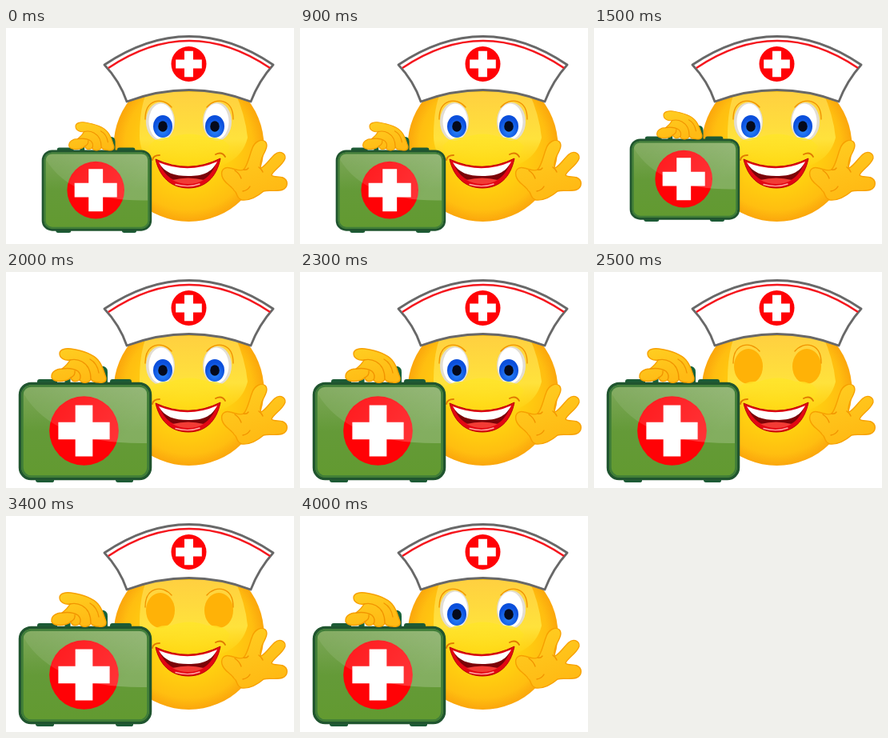
Write an HTML page that moves like this. It is 360 px wide and 270 px high and loops after 4.5 s.

```html
<!DOCTYPE html>
<html lang="en">
<head>
<meta charset="utf-8">
<title>Nurse smiley with first-aid kit</title>
<style>
  html, body { margin: 0; width: 100%; height: 100%; overflow: hidden; background: #fff; }
  svg { display: block; width: 100%; height: 100%; }
  .skin { fill: url(#skin); stroke: #f7a000; stroke-width: 1.4; stroke-linejoin: round; }
  .crease { fill: none; stroke: #f29400; stroke-width: 1.4; stroke-linecap: round; }
</style>
</head>
<body>
<svg viewBox="0 0 360 270">
  <defs>
    <radialGradient id="face" cx=".5" cy=".5" r=".5">
      <stop offset="0" stop-color="#ffdc14"/>
      <stop offset=".5" stop-color="#ffd210"/>
      <stop offset=".85" stop-color="#ffbe10"/>
      <stop offset="1" stop-color="#fba60c"/>
    </radialGradient>
    <linearGradient id="shine" x2="0" y2="1">
      <stop offset="0" stop-color="#ffd040"/>
      <stop offset=".6" stop-color="#ffe23c"/>
      <stop offset="1" stop-color="#ffe020" stop-opacity="0"/>
    </linearGradient>
    <linearGradient id="cheek" x2="0" y2="1">
      <stop offset="0" stop-color="#ffe52c"/>
      <stop offset="1" stop-color="#ffdc14" stop-opacity="0"/>
    </linearGradient>
    <linearGradient id="skin" x2=".4" y2="1">
      <stop offset="0" stop-color="#ffcf22"/>
      <stop offset="1" stop-color="#ffba14"/>
    </linearGradient>
    <radialGradient id="iris" cy=".65">
      <stop offset="0" stop-color="#2f8cff"/>
      <stop offset="1" stop-color="#0b4fdc"/>
    </radialGradient>
    <linearGradient id="case" x2="0" y2="1">
      <stop offset="0" stop-color="#7fa85c"/>
      <stop offset=".5" stop-color="#649a38"/>
      <stop offset="1" stop-color="#629a30"/>
    </linearGradient>
    <linearGradient id="gloss" x2="1" y2=".3">
      <stop offset="0" stop-color="#fff" stop-opacity=".06"/>
      <stop offset="1" stop-color="#fff" stop-opacity=".2"/>
    </linearGradient>
    <g id="emblem">
      <circle r="22" fill="#ff0206"/>
      <path d="M-5.500-16.300H5.500V-5.500H16.300V5.500H5.500V16.300H-5.500V5.500H-16.300V-5.500H-5.500Z" fill="#fff"/>
    </g>
    <g id="eye">
      <ellipse cx="193" cy="117" rx="18" ry="24" fill="#e2ddd2"/>
      <ellipse cx="194" cy="117" rx="15.500" ry="22.500" fill="#fff"/>
      <ellipse cx="196" cy="123" rx="12" ry="14" fill="url(#iris)"/>
      <ellipse cx="196" cy="123" rx="5.800" ry="6.800" fill="#050a1c"/>
    </g>
    <ellipse id="lid" cx="193" cy="118" rx="18" ry="22" fill="#ffb207"/>
    <path id="brow" d="M174 114C174 88 196 86 207 99" class="crease"/>
  </defs>

  <rect width="360" height="270" fill="#fff"/>
  <circle cx="228.500" cy="148" r="94" fill="url(#face)"/>
  <path d="M176 80H286Q299 108 302 137Q292 178 229 178Q167 178 167 135Q167 100 176 80Z" fill="url(#shine)"/>

  <g id="open">
    <use href="#eye"/>
    <use href="#eye" transform="matrix(-1 0 0 1 457 0)"/>
  </g>
  <g id="closed">
    <use href="#lid"/>
    <use href="#lid" transform="matrix(-1 0 0 1 459 0)"/>
  </g>
  <use href="#brow"/>
  <use href="#brow" transform="matrix(-1 0 0 1 458 0)"/>
  <path d="M178 148Q188 135 206 137Q229 128 252 137Q270 135 280 148L268 170H190Z" fill="url(#cheek)"/>

  <g id="mouth">
    <path d="M187 164Q228 183 268 163C263 188 248 200 228 200C206 200 192 186 187 164Z" fill="#e30613" stroke="#b90008" stroke-width="1"/>
    <path d="M192 169Q228 183 263 168C257 185 246 194 228 194C210 194 198 185 192 169Z" fill="#7b0308"/>
    <path d="M191 168Q228 183 264 167C257 181 246 185 228 185C210 185 198 181 191 168Z" fill="#fff"/>
    <path d="M208 190Q228 185 247 190Q239 195 228 195Q217 195 208 190Z" fill="#f23b35"/>
    <path d="M212 195.500Q228 200 242 195" fill="none" stroke="#ffaaa4" stroke-width="1.400" stroke-linecap="round"/>
    <path d="M183 165Q184 159 192 159M262 158Q270 154 274 161" class="crease" style="stroke:#e07a00;stroke-width:1.800"/>
  </g>

  <g id="hat">
    <path d="M123 46Q229-25 334 46Q316 66 306 92Q229 63 151 92Q142 66 123 46Z" fill="#fff" stroke="#686868" stroke-width="2.800" stroke-linejoin="round"/>
    <path d="M128 50Q229-18 330 50" fill="none" stroke="#f5161d" stroke-width="2.600"/>
    <use href="#emblem" x="228.500" y="45"/>
  </g>

  <g id="wave">
    <path class="skin" d="M270 185C268 177 274 173 280 175C286 176 292 180 297 177C302 172 304 160 308 150C311 142 319 138 324 142C329 147 323 155 320 162C318 168 317 173 319 175C326 171 330 163 336 158C343 152 352 158 348 165C344 173 334 178 332 184C335 187 341 185 346 187C353 190 353 199 346 202C338 205 329 202 322 204C315 210 305 216 295 215C287 213 290 206 285 203C281 196 272 194 270 185Z"/>
    <path class="crease" d="M286 178Q292 182 294 188M297 177Q301 178 303 175M316 174Q320 177 321 180M296 204Q302 203 305 198"/>
  </g>

  <g id="kit">
    <path d="M77 139V125Q77 121 81 121H119Q123.500 121 123.500 125V139" fill="none" stroke="#17633a" stroke-width="7"/>
    <path d="M39 140V137Q39 134 42 134H61Q64 134 64 137V140M130 140V137Q130 134 133 134H154Q157 134 157 137V140M37 258H60V261Q60 263 57 263H40Q37 263 37 260M137 258H159V261Q159 263 156 263H140Q137 263 137 260" fill="#1d5b36"/>
    <rect x="17.500" y="139.500" width="163" height="119" rx="14" fill="url(#case)" stroke="#20552f" stroke-width="3.500"/>
    <rect x="20.500" y="142.500" width="157" height="113" rx="11" fill="none" stroke="#3f7d38" stroke-width="2.500"/>
    <use href="#emblem" transform="translate(97.500 198.500) scale(1.970)"/>
    <path d="M22 152Q22 144 30 144H168Q176 144 176 152V214Q60 216 22 152Z" fill="url(#gloss)"/>
    <path class="skin" d="M70 121C74 118 78 114 80 110C74 111 67 108 67 102C67 97 74 95 81 96C94 98 108 102 115 110C121 117 122 124 125 132C126 138 120 139 116 138C111 138 108 137 106 134C104 139 95 140 92 135C87 138 82 137 81 132C76 137 60 139 57 132C56 125 63 121 70 121Z"/>
    <path class="crease" d="M80 110Q88 108 95 112M70 121Q82 119 90 124Q95 129 92 135M81 132Q87 129 86 124M95 112Q106 118 106 134M105 109Q114 114 116 126"/>
  </g>
</svg>
<script>
  const LOOP = 4500;
  const kit = document.getElementById("kit");
  const open = document.getElementById("open");
  const closed = document.getElementById("closed");

  // The small kit keeps its right edge at x = 182; top is the height of the hand.
  const smallKit = top => `translate(182 ${top}) scale(.826) translate(-182 -96)`;

  function draw(time) {
    const t = time % LOOP;
    const blink = t >= 2500 && t < 4000;
    kit.setAttribute("transform", t < 1500 ? smallKit(118) : t < 2000 ? smallKit(104) : "");
    open.style.display = blink ? "none" : "";
    closed.style.display = blink ? "" : "none";
  }

  let start;
  function tick(now) {
    start ??= now;
    draw(now - start);
    requestAnimationFrame(tick);
  }
  draw(0);
  requestAnimationFrame(tick);
</script>
</body>
</html>
```
